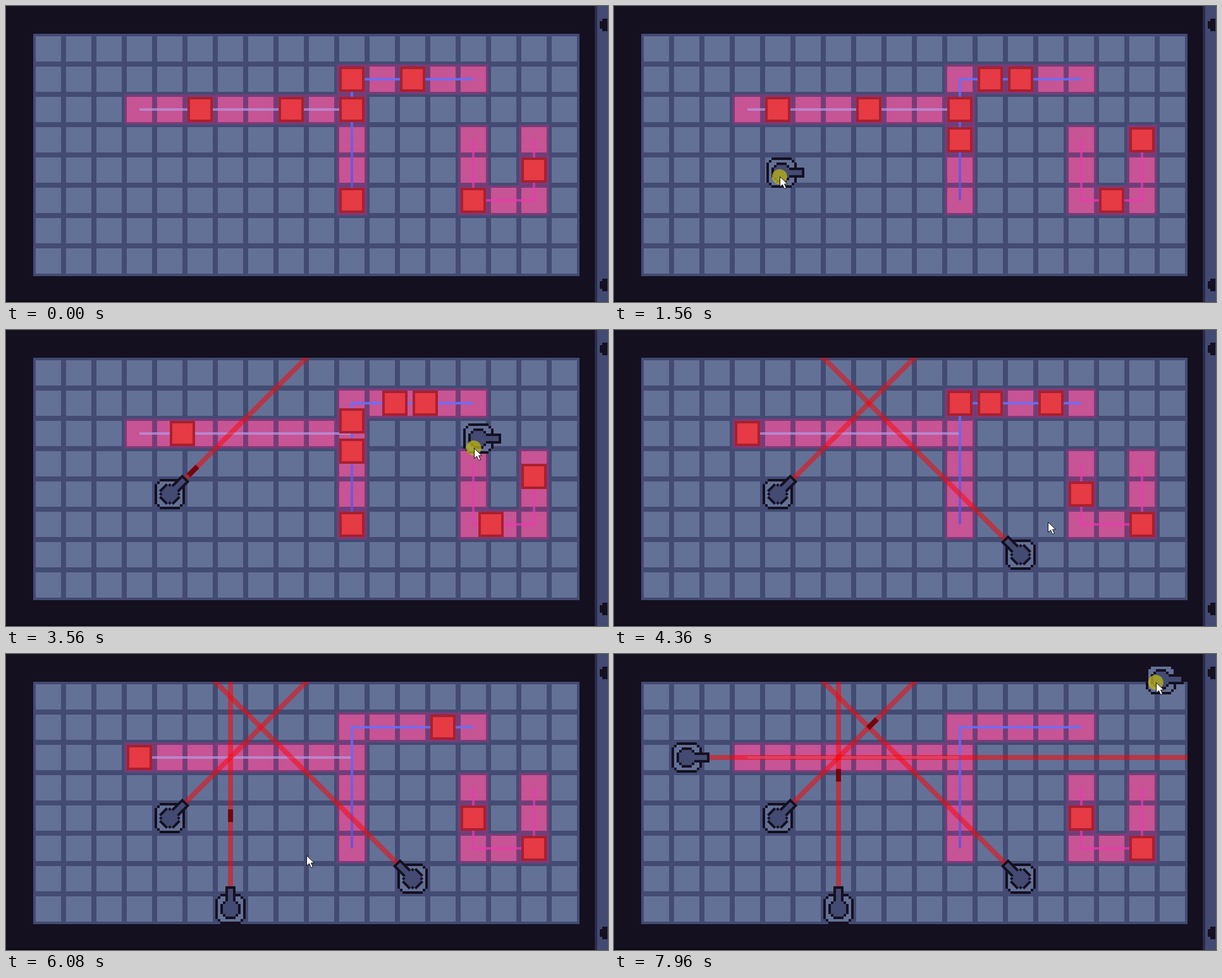
Animation, 952 px wide and 469 px high, one loop 8000 ms. Source, as an HTML page with a canvas:

```html
<!DOCTYPE html>
<html lang="en">
<head>
<meta charset="utf-8">
<title>Laser tower grid</title>
<style>
  html, body { margin: 0; width: 100%; height: 100%; overflow: hidden; background: #141020; }
  canvas { display: block; }
</style>
</head>
<body>
<canvas id="stage" width="952" height="469"></canvas>
<script>
const ctx = document.getElementById('stage').getContext('2d');
const LOOP = 8000, TICK = 600, FIRST_TICK = 530, MOVE = 75;
const CELL = 48, COLS = 18, ROWS = 8, LEFT = 43, TOP = 44, PIXEL = 4;
const BULLET_START = 27, BULLET_SPEED = 0.8, BULLET_LIFE = 400;
const SHOP_X = 905, CARRY_LAG = 11;
const INK = '#141020', SLATE = '#434b73', STEEL = '#647196';

const centerX = col => LEFT + CELL * (col + 0.5);
const centerY = row => TOP + CELL * (row + 0.5);
const tickTime = k => FIRST_TICK + TICK * k;
const rad = deg => deg * Math.PI / 180;
const mix = (a, b, f) => a + (b - a) * f;
const clamp01 = v => Math.min(1, Math.max(0, v));
const smooth = v => { const f = clamp01(v); return f * f * (3 - 2 * f); };

// Corners in cells; one enemy spawns every third tick, offset by phase.
const tracks = [
  { corners: [[3, 2], [10, 2], [10, 1], [14, 1]], phase: 1 },
  { corners: [[10, 5], [10, 1], [14, 1]], phase: 0 },
  { corners: [[16, 3], [16, 5], [14, 5], [14, 3]], phase: 2 }
];

// Each tower is picked in the shop at height shopY, placed on a cell, then aimed.
const towers = [
  { col: 4, row: 4, aim: -45, shopY: 50, picked: 900, placed: 1600, ready: 2050 },
  { col: 12, row: 6, aim: -135, shopY: 50, picked: 3240, placed: 3790, ready: 4080 },
  { col: 6, row: 7, aim: -90, shopY: 58, picked: 5142, placed: 5842, ready: 5880 },
  { col: 1, row: 2, aim: 0, shopY: 50, picked: 6540, placed: 7122, ready: 7122 },
  { col: 8, row: 4, aim: 0, shopY: 41, picked: 7840, placed: 8440, ready: 8440 }
];

function cellsOf(corners) {
  const cells = [corners[0]];
  for (const [col, row] of corners.slice(1)) {
    let [c, r] = cells[cells.length - 1];
    while (c !== col || r !== row) {
      c += Math.sign(col - c);
      r += Math.sign(row - r);
      cells.push([c, r]);
    }
  }
  return cells;
}

const enemies = [];
for (const track of tracks) {
  track.cells = cellsOf(track.corners);
  for (let spawn = track.phase - 9; tickTime(spawn - 1) < LOOP; spawn += 3)
    enemies.push({ cells: track.cells, spawn, dies: Infinity });
}

// Resolve every shot once: the nearest enemy on the ray is destroyed.
const bullets = [];
for (let k = 0; tickTime(k) < LOOP; k++) {
  const fired = tickTime(k);
  for (const tower of towers.filter(({ ready }) => ready <= fired)) {
    const dx = Math.round(Math.cos(rad(tower.aim))), dy = Math.round(Math.sin(rad(tower.aim)));
    let victim = null, reach = Infinity;
    for (const enemy of enemies) {
      const cell = enemy.cells[k + 1 - enemy.spawn];
      if (!cell || enemy.dies < Infinity) continue;
      const x = cell[0] - tower.col, y = cell[1] - tower.row;
      const steps = Math.max(Math.abs(x), Math.abs(y));
      const distance = Math.hypot(x, y) * CELL;
      if (x === dx * steps && y === dy * steps && distance < reach) {
        victim = enemy;
        reach = distance;
      }
    }
    let ends = fired + BULLET_LIFE;
    if (victim) {
      victim.dies = fired + (reach - 30 - BULLET_START) / BULLET_SPEED;
      ends = Math.min(ends, victim.dies);
    }
    bullets.push({ tower, fired, ends });
  }
}

function rect(color, x, y, w, h) {
  ctx.fillStyle = color;
  ctx.fillRect(x, y, w, h);
}

function square(color, x, y, half) {
  rect(color, x - half, y - half, half * 2, half * 2);
}

function trackLine(corners, color) {
  ctx.strokeStyle = color;
  ctx.lineWidth = 4;
  ctx.beginPath();
  corners.forEach(([c, r]) => ctx.lineTo(centerX(c), centerY(r)));
  ctx.stroke();
}

function drawBoard() {
  rect(INK, 0, 0, 952, 469);
  rect('#0c0a16', 0, 467, 931, 2);
  rect(SLATE, LEFT, TOP, COLS * CELL, ROWS * CELL);
  for (let c = 0; c < COLS; c++)
    for (let r = 0; r < ROWS; r++)
      square(STEEL, centerX(c), centerY(r), 20);

  const cells = tracks.flatMap(track => track.cells);
  const pad = (color, half) => cells.forEach(([c, r]) => square(color, centerX(c), centerY(r), half));
  pad('#66417a', 24);
  pad('#7b3b77', 23);
  pad('#c75494', 20);

  trackLine(tracks[0].corners.slice(0, 2), 'rgba(180,155,230,.7)');
  const fade = ctx.createLinearGradient(0, centerY(5), 0, centerY(1));
  fade.addColorStop(0, 'rgba(95,80,220,.85)');
  fade.addColorStop(1, 'rgba(100,112,255,.85)');
  trackLine(tracks[1].corners, fade);
  trackLine(tracks[2].corners, 'rgba(238,55,178,.7)');
}

function drawEnemies(t) {
  const k = Math.floor((t - FIRST_TICK) / TICK);
  const progress = Math.min(1, (t - tickTime(k)) / MOVE);
  for (const { cells, spawn, dies } of enemies) {
    const place = Math.max(0, k - spawn + progress);
    if (spawn > k + 1 || place >= cells.length - 1 || t >= dies) continue;
    const i = Math.floor(place), [from, to] = cells.slice(i, i + 2);
    const x = Math.round(centerX(mix(from[0], to[0], place - i)));
    const y = Math.round(centerY(mix(from[1], to[1], place - i)));
    square('#a8202e', x, y, 20);
    square('#e63a44', x, y, 16);
  }
}

function alongAim(tower, angle, draw) {
  ctx.save();
  ctx.beginPath();
  ctx.rect(LEFT, TOP, COLS * CELL, ROWS * CELL);
  ctx.clip();
  ctx.translate(centerX(tower.col), centerY(tower.row));
  ctx.rotate(rad(angle));
  draw();
  ctx.restore();
}

// A disc of chunky pixels with stepped corners.
function pixelDisc(radius, fill) {
  const side = radius - 2, inner = radius - 1;
  rect(fill, -inner, -side, inner * 2, side * 2);
  rect(fill, -side, -inner, side * 2, inner * 2);
  for (let turn = 0; turn < 4; turn++) {
    rect(INK, -side, -radius, side * 2, 1);
    rect(INK, -inner, -inner, 1, 1);
    ctx.rotate(Math.PI / 2);
  }
}

function drawTower(x, y, angle) {
  ctx.save();
  ctx.translate(x, y);
  ctx.scale(PIXEL, PIXEL);
  pixelDisc(6, STEEL);
  ctx.rotate(rad(angle));
  pixelDisc(4, SLATE);
  rect(INK, 3, -2, 6, 4);
  rect(SLATE, 2, -1, 6, 2);
  ctx.restore();
}

function drawTowers(t) {
  const standing = towers.filter(tower => t >= tower.placed);
  const angleOf = ({ aim, ready }) => t < ready ? aim + 90 : aim;
  for (const tower of standing)
    alongAim(tower, angleOf(tower), () => rect('rgba(255,0,0,.5)', 32, -4, 1000, 8));
  for (const { tower, fired, ends } of bullets) {
    if (t < fired || t >= ends) continue;
    const distance = BULLET_START + (t - fired) * BULLET_SPEED;
    alongAim(tower, tower.aim, () => rect('#76040e', distance - 10, -4, 20, 8));
  }
  for (const tower of standing)
    drawTower(centerX(tower.col), centerY(tower.row), angleOf(tower));
}

function drawPanel(t) {
  const open = Math.max(...towers.map(({ picked }) =>
    Math.min(smooth((t - picked + 320) / 120), smooth((picked + 50 - t) / 120))));
  const x = Math.round(935 - 56 * open);
  rect('#2b2c4a', x - 4, 0, 4, 469);
  rect(SLATE, x, 0, 952 - x, 469);
  for (const y of [30, 442]) {
    rect(INK, x + 4, y - 6, 12, 12);
    rect(INK, x + 8, y - 10, 8, 20);
  }
}

const dropPoint = ({ col, row }) => [centerX(col) - 3, centerY(row) + 14];

function cursorAt(t) {
  const next = towers.findIndex(({ picked }) => picked > t);
  const current = towers[(next < 0 ? towers.length : next) - 1];
  if (current && t < current.placed) {
    const [x, y] = dropPoint(current);
    const f = smooth((t - current.picked) / (current.placed - current.picked));
    return [mix(SHOP_X, x, f), mix(current.shopY, y, f ** 1.8)];
  }
  const { picked, shopY } = towers[next];
  const leaves = current ? current.ready : 480;
  const [x, y] = current ? dropPoint(current) : [975, 60];
  const f = smooth((t - leaves) / (picked - leaves));
  return [mix(x, SHOP_X, f), mix(y, shopY, 1 - (1 - f) ** 1.25)];
}

function drawCursor(t) {
  const [x, y] = cursorAt(t);
  if (towers.some(({ picked, placed }) => t >= picked && t < placed)) {
    const [tx, ty] = cursorAt(t - CARRY_LAG);
    drawTower(Math.round(tx), Math.round(ty) - 4, 0);
    ctx.fillStyle = 'rgba(190,180,20,.75)';
    ctx.beginPath();
    ctx.arc(x, y, 12, 0, Math.PI * 2);
    ctx.fill();
  }
  ctx.save();
  ctx.translate(Math.round(x) + 0.5, Math.round(y) + 0.5);
  ctx.beginPath();
  for (const [px, py] of [[0, 0], [0, 16], [4, 12.5], [7, 19], [10, 18], [7, 11.5], [12, 11.5]])
    ctx.lineTo(px, py);
  ctx.closePath();
  ctx.fillStyle = '#fff';
  ctx.fill();
  ctx.strokeStyle = '#111';
  ctx.lineWidth = 1;
  ctx.stroke();
  ctx.restore();
}

const start = performance.now();
function render() {
  const t = Math.max(0, performance.now() - start) % LOOP;
  drawBoard();
  drawEnemies(Math.max(t, 20));
  drawTowers(t);
  drawPanel(t);
  drawCursor(t);
  requestAnimationFrame(render);
}
render();
</script>
</body>
</html>
```
